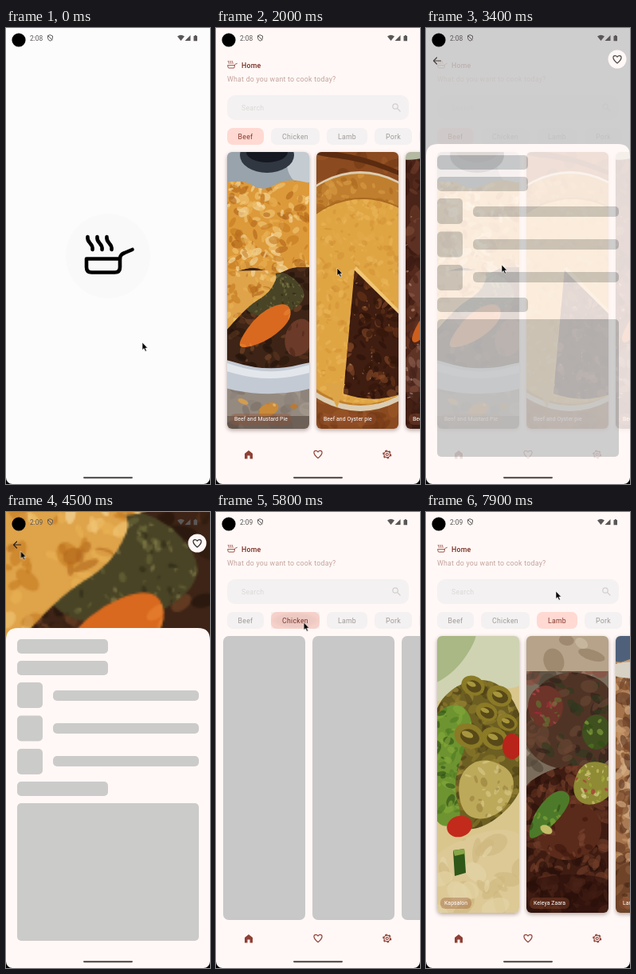
Recreate the animation shown at these times as an HTML page with a canvas. Size 256 px wide and 570 px high, loop 8000 ms.

```html
<!DOCTYPE html>
<html lang="en">
<head>
<meta charset="utf-8">
<title>Recipe app</title>
<style>
  html, body { margin: 0; width: 100%; height: 100%; overflow: hidden; background: #fff8f6; }
  #stage { position: relative; width: 256px; height: 570px; overflow: hidden; font-family: Roboto, Arial, sans-serif; }
  #stage > * { position: absolute; left: 0; top: 0; }
  svg { display: block; }
  text { font-size: 8.72px; letter-spacing: .27px; }
  .loop, .chip, .chip rect, .chip text, .row canvas, .ripple, #cursor {
    animation: 8s linear infinite both;
  }
  .line { fill: none; stroke: currentColor; stroke-linecap: round; stroke-linejoin: round; }

  /* cards */
  .row { width: 256px; height: 570px; }
  .card { position: absolute; top: 155px; width: 103px; height: 346px; border-radius: 6px; background: #f6eeec;
    box-shadow: 0 2px 5px rgba(70, 45, 40, .4); }
  .card canvas { display: block; border-radius: 6px; }
  .card span { position: absolute; left: 4px; bottom: 5px; padding: 0 5px; border-radius: 6px; white-space: nowrap;
    font-size: 6.85px; line-height: 14px; letter-spacing: .08px; color: #fff; background: rgba(150, 80, 50, .36); }
  .skel i { position: absolute; top: 155px; width: 103px; height: 355px; border-radius: 7px; background: #c8c8c8; }

  #splash { animation-name: splash; }
  #skel { animation-name: skel; }
  #beef { animation-name: beef; }
  #beef .track { animation-name: drag; }
  #lamb { animation-name: lamb; }
  #lamb canvas { animation-name: load; }
  #detail { animation-name: detail; }
  #hero { animation-name: hero; }
  #bars { animation-name: pulse; }
  #early { animation-name: early; }
  #late { animation-name: late; }
  #cursor { animation-name: cursor; animation-timing-function: ease-in-out; }

  @keyframes splash { 0%, 3.2% { opacity: 1 } 5.8%, 100% { opacity: 0 } }
  @keyframes skel {
    0%, 12% { opacity: 1 } 15.5%, 71.2% { opacity: 0 }
    71.25%, 83.7% { opacity: 1 } 85.6%, 100% { opacity: 0 }
  }
  @keyframes beef { 0%, 12% { opacity: 0 } 17%, 71.2% { opacity: 1 } 71.25%, 100% { opacity: 0 } }
  @keyframes lamb { 0%, 83.7% { opacity: 0 } 85.6%, 100% { opacity: 1 } }
  @keyframes load { 0%, 93.8% { opacity: 0 } 97.8%, 100% { opacity: 1 } }
  @keyframes drag {
    0%, 25% { transform: none; animation-timing-function: ease-in-out }
    30% { transform: translateX(-112px) }
    31.25% { transform: translateX(-86.5px); animation-timing-function: ease-out }
    35%, 100% { transform: none }
  }
  @keyframes detail {
    0%, 38.2% { opacity: 0 } 42.5% { opacity: .86 } 45.6%, 59.8% { opacity: 1 } 63.1%, 100% { opacity: 0 }
  }
  @keyframes hero { 0%, 48% { opacity: 0 } 52.5%, 100% { opacity: 1 } }
  @keyframes pulse { 0%, 47.5% { opacity: 1 } 52.5% { opacity: .75 } 57.5%, 100% { opacity: 1 } }
  @keyframes early { 0%, 50% { opacity: 1 } 50.01%, 100% { opacity: 0 } }
  @keyframes late { 0%, 50% { opacity: 0 } 50.01%, 100% { opacity: 1 } }
  @keyframes cursor {
    0%, 10% { transform: translate(171px, 393px) }
    18.75%, 25% { transform: translate(152px, 300px) }
    30% { transform: translate(119px, 296px); animation-timing-function: linear }
    31.25% { transform: translate(145.5px, 294px); animation-timing-function: ease-out }
    34%, 36.25% { transform: translate(170px, 295px) }
    38%, 47.5% { transform: translate(95px, 296px) }
    57.5%, 59.5% { transform: translate(16px, 41px) }
    63.75%, 72% { transform: translate(109.5px, 138px) }
    78.75%, 93.8% { transform: translate(168px, 138px) }
    98.5%, 100% { transform: translate(163px, 99px) }
  }

  /* filter chips: current colour pair switches hard */
  .chip { --on: #ffd9d2; --ink: #84392d; }
  .chip rect { fill: #f3f1f1; }
  .chip text { fill: #a09a99; text-anchor: middle; }
  .c1 rect { animation-name: bg1 } .c1 text { animation-name: ink1 }
  .c2 rect { animation-name: bg2 } .c2 text { animation-name: ink2 }
  .c3 rect { animation-name: bg3 } .c3 text { animation-name: ink3 }
  @keyframes bg1 { 0%, 71.2% { fill: var(--on) } 71.25%, 100% { fill: #f3f1f1 } }
  @keyframes ink1 { 0%, 71.2% { fill: var(--ink) } 71.25%, 100% { fill: #a09a99 } }
  @keyframes bg2 { 0%, 71.2% { fill: #f3f1f1 } 71.25%, 82.4% { fill: var(--on) } 82.5%, 100% { fill: #f3f1f1 } }
  @keyframes ink2 { 0%, 71.2% { fill: #a09a99 } 71.25%, 82.4% { fill: var(--ink) } 82.5%, 100% { fill: #a09a99 } }
  @keyframes bg3 { 0%, 82.4% { fill: #f3f1f1 } 82.5%, 100% { fill: var(--on) } }
  @keyframes ink3 { 0%, 82.4% { fill: #a09a99 } 82.5%, 100% { fill: var(--ink) } }
  .ripple { fill: url(#press); }
  #tap2 { animation-name: tap2 }
  #tap3 { animation-name: tap3 }
  @keyframes tap2 { 0%, 69.5% { opacity: 0 } 71.2% { opacity: 1 } 74%, 100% { opacity: 0 } }
  @keyframes tap3 { 0%, 80% { opacity: 0 } 81.1%, 82% { opacity: 1 } 85%, 100% { opacity: 0 } }
</style>
</head>
<body>
<div id="stage">
  <svg width="256" height="570">
    <defs>
      <symbol id="pan" viewBox="96 255 66 55">
        <g class="line" stroke-width="4.6">
          <path d="M101 288.5H143V299Q143 305.5 136.500 305.500H107.500Q101 305.500 101 299Z"/>
          <path d="M143 288.500Q143 283 149 281L158.500 277"/>
          <path id="steam" d="M102.500 261C101 269 110 269 108.500 277M114.500 261C113 269 122 269 120.500 277M126.500 261C125 269 134 269 132.500 277"/>
        </g>
      </symbol>
      <radialGradient id="press">
        <stop offset="0" stop-opacity=".15"/><stop offset=".75" stop-opacity=".13"/><stop offset="1" stop-opacity=".07"/>
      </radialGradient>
    </defs>
    <rect width="256" height="570" fill="#fff8f6"/>
    <use href="#pan" x="14" y="40" width="13" height="11" color="#8f4035"/>
    <text x="32" y="49.500" font-weight="500" fill="#76291e">Home</text>
    <text x="14" y="67" fill="#c3a39e">What do you want to cook today?</text>
    <rect x="14" y="84" width="228" height="31" rx="10" fill="#f3f1f1"/>
    <text x="32" y="103" fill="#dcd8d8">Search</text>
    <g class="line" color="#d3cecd" stroke-width="1.200"><circle cx="225" cy="98" r="3.200"/><path d="M227.500 100.500L231 104"/></g>

    <g class="chip c1"><rect x="14" y="125" width="46" height="21" rx="7"/><text x="37" y="138.700">Beef</text></g>
    <g class="chip c2"><rect x="69" y="125" width="61" height="21" rx="7"/><text x="99.500" y="138.700">Chicken</text></g>
    <g class="chip c3"><rect x="139" y="125" width="51" height="21" rx="7"/><text x="164.500" y="138.700">Lamb</text></g>
    <g class="chip"><rect x="199" y="125" width="47" height="21" rx="7"/><text x="222.500" y="138.700">Pork</text></g>
    <g class="chip"><rect x="255" y="125" width="40" height="21" rx="7"/></g>
    <rect id="tap2" class="ripple" x="69" y="125" width="61" height="21"/>
    <rect id="tap3" class="ripple" x="139" y="125" width="51" height="21"/>

    <g color="#8f4035">
      <path fill="currentColor" d="M36 532L41 528L46 532V538.500H42.500V534.500H39.500V538.500H36Z"/>
      <path class="line" stroke-width="1.200" d="M128 537.700C121 532 122.500 528.300 125.200 528.300Q127 528.300 128 530Q129 528.300 130.800 528.300C133.500 528.300 135 532 128 537.700Z"/>
      <g fill="none" stroke="currentColor" stroke-width="1.200">
        <circle cx="214.700" cy="533" r="3.800"/><circle cx="214.700" cy="533" r="1.500"/>
        <circle cx="214.700" cy="533" r="4.800" stroke-width="1.500" pathLength="12" stroke-dasharray="1 1"/>
      </g>
    </g>
  </svg>

  <div id="skel" class="row skel loop"><i style="left:9px"></i><i style="left:121px"></i><i style="left:233px"></i></div>
  <div id="beef" class="row loop"><div class="track loop"></div></div>
  <div id="lamb" class="row loop"><div class="track"></div></div>

  <div id="detail" class="loop" style="width:256px;height:570px">
    <div style="position:absolute;width:256px;height:570px;background:#c8c8c8"></div>
    <canvas id="hero" class="loop" width="256" height="165" style="position:absolute"></canvas>
    <svg width="256" height="570" style="position:absolute">
      <path fill="#fff8f6" d="M0 570V160Q0 145 15 145H241Q256 145 256 160V570Z"/>
      <g id="bars" class="loop" fill="#c8c8c8">
        <rect x="14" y="159" width="114" height="18" rx="5"/><rect x="14" y="186" width="114" height="18" rx="5"/>
        <rect x="14" y="213" width="32" height="32" rx="5"/><rect x="59" y="223" width="183" height="13" rx="5"/>
        <rect x="14" y="254.500" width="32" height="32" rx="5"/><rect x="59" y="264" width="183" height="13" rx="5"/>
        <rect x="14" y="296" width="32" height="32" rx="5"/><rect x="59" y="305" width="183" height="13" rx="5"/>
        <rect x="14" y="337" width="114" height="18" rx="5"/><rect x="14" y="364" width="228" height="172" rx="5"/>
      </g>
      <path class="line" color="#2d2523" stroke-width="1.200" d="M18.500 41H9.500M13.500 37L9.500 41L13.500 45"/>
      <circle cx="240" cy="39" r="11.500" fill="#fff8f6"/>
      <path class="line" color="#2d2523" stroke-width="1.200" d="M240 44C233 38.300 234.500 34.600 237.200 34.600Q239 34.600 240 36.300Q241 34.600 242.800 34.600C245.500 34.600 247 38.300 240 44Z"/>
    </svg>
  </div>

  <svg id="splash" class="loop" width="256" height="570">
    <rect width="256" height="570" fill="#fcfcfc"/>
    <circle cx="128" cy="285" r="53" fill="#f9f9f9"/>
    <use href="#pan" x="96" y="255" width="66" height="55" color="#000"/>
  </svg>

  <svg width="256" height="570">
    <circle cx="16" cy="15" r="8.600"/>
    <g fill="#5b5757">
      <text id="early" class="loop" x="30" y="16" style="font-size:8.4px;letter-spacing:0">2:08</text>
      <text id="late" class="loop" x="30" y="16" style="font-size:8.4px;letter-spacing:0">2:09</text>
      <path d="M215 10.500Q219.500 7 224 10.500L219.500 16Z"/>
      <path d="M224.500 16H231.500V9Z"/>
      <path d="M235.500 10H236.800V9H238.800V10H240V16.200H235.500Z"/>
    </g>
    <path class="line" color="#5b5757" stroke-width="1" d="M55.500 8.800L58.500 10V12.500Q58.500 15 55.500 16.200Q52.500 15 52.500 12.500V10ZM53 10L58 15"/>
    <rect x="97" y="561" width="62" height="2.200" rx="1.100" fill="#5b5757"/>
    <path d="M0 562A8 8 0 0 0 8 570H0ZM256 562A8 8 0 0 1 248 570H256Z"/>
  </svg>

  <svg id="cursor" width="10" height="14" style="overflow:visible">
    <path d="M0 0V9.500L2.200 7.600L3.800 11.200L5.400 10.500L3.900 7.100H6.700Z" stroke="#fff" stroke-width=".6"/>
  </svg>
</div>

<script>
const W = 103, H = 346;

// Smooth closed outline through the midpoints of the given corners.
function soft(...p) {
  const path = new Path2D(), n = p.length / 2;
  const at = i => [p[(i % n) * 2], p[(i % n) * 2 + 1]];
  const mid = i => at(i).map((v, k) => (v + at(i + 1)[k]) / 2);
  path.moveTo(...mid(0));
  for (let i = 1; i <= n; i++) path.quadraticCurveTo(...at(i), ...mid(i));
  path.closePath();
  return path;
}

function oval(x, y, rx, ry = rx, turn = 0) {
  const path = new Path2D();
  path.ellipse(x, y, rx, ry, turn, 0, 7);
  return path;
}

function box(x, y, w, h) {
  const path = new Path2D();
  path.rect(x, y, w, h);
  return path;
}

// Returns fill(path, colour, specks, size, tints): a flat area with seeded texture.
function painter(canvas, seed) {
  const c = canvas.getContext('2d');
  const rnd = () => (seed = (seed * 16807) % 2147483647) / 2147483647;
  return (path, colour, specks = 0, size = 0, tints = []) => {
    c.save();
    c.filter = 'blur(0.6px)';
    c.fillStyle = colour;
    c.fill(path);
    c.clip(path);
    c.globalAlpha = .6;
    for (let i = 0; i < specks; i++) {
      c.fillStyle = tints[i % tints.length];
      const r = size * (.4 + rnd());
      c.fill(oval(rnd() * W, rnd() * H, r, r * (.3 + rnd() * .5), rnd() * 3));
    }
    c.restore();
  };
}

const gold = ['#f1c878', '#c57a20', '#e9b255', '#f6dfa8', '#b0661a'];
const gravy = ['#5c3520', '#2a170e', '#7a4a2a', '#1f120c'];
const leaf = ['#4f7a22', '#86a83a', '#2d4d14'];

function mustardPie(fill) {
  fill(box(0, 0, W, H), '#98a3ac');
  fill(oval(95, 14, 20, 26), '#c4cbd1');
  fill(oval(50, 4, 34, 22), '#303741');
  fill(oval(50, 0, 26, 13), '#151820');
  fill(box(0, 125, W, 150), '#3d2416', 260, 6, gravy);
  fill(soft(15, 168, 50, 145, 85, 155, 103, 185, 60, 210, 20, 200), '#4a4426', 900, 2.2, ['#6d6a3a', '#2c2a18', '#8a8450']);
  fill(soft(12, 240, 40, 200, 76, 186, 82, 208, 55, 234, 22, 246), '#d9691e', 120, 5, ['#e88434', '#b9500f']);
  fill(oval(90, 232, 17, 24, .3), '#6b3a28', 90, 5, ['#85503a', '#4c2619']);
  fill(soft(-20, 42, 20, 34, 45, 50, 75, 32, 125, 44, 125, 146, 85, 142, 60, 155, 30, 140, -20, 165), '#dd9a3a', 520, 6, gold);
  fill(soft(-20, 150, 30, 148, 66, 148, 54, 176, 26, 192, -20, 245), '#dfa349', 420, 5, gold);
  fill(soft(-20, 268, 50, 284, 125, 270, 125, 380, -20, 380), '#958a80', 200, 9, ['#a89c90', '#7c6f66', '#8b8078']);
  fill(soft(-30, 250, 50, 276, 130, 256, 130, 292, 50, 306, -30, 290), '#c3cad4');
  fill(soft(-30, 254, 50, 280, 130, 259, 130, 270, 50, 288, -30, 266), '#e3e7ec');
  fill(oval(52, 322, 13, 8, -.4), '#c98a3a', 200, 3, gold);
  fill(oval(20, 312, 7, 3, .4), '#d39c50');
  fill(oval(84, 318, 5, 3), '#b97a34');
  fill(box(0, 330, W, 16), 'rgba(60,45,38,.45)');
}

function oysterPie(fill) {
  fill(box(0, 0, W, H), '#8b4a1f', 120, 10, ['#9c5827', '#733a16']);
  fill(soft(-10, -5, 60, 5, 120, 30, 120, 36, 60, 12, -10, 3), '#5b2b10');
  fill(oval(55, 174, 120, 150), '#dccdb2');
  fill(oval(55, 172, 118, 145), '#c07f2e', 260, 6, ['#d99b45', '#a9661f']);
  fill(oval(58, 185, 112, 128), '#a9691f');
  fill(oval(58, 187, 112, 128), '#e0a543', 520, 4, ['#e9b65a', '#d29235', '#e3a84a']);
  const wedge = new Path2D('M48 146L112 210V300Q75 316 34 302Z');
  fill(wedge, '#3f1d10', 420, 6, ['#6b3519', '#2a110a', '#854a28', '#321509']);
  fill(wedge, 'rgba(0,0,0,0)', 160, 1.2, ['#b98a68']);
  fill(new Path2D('M12 290L36 290L26 320Z'), '#dda548');
  fill(new Path2D('M47 147L112 211V206L50 143Z'), '#f0c674');
}

function asado(fill) {
  fill(box(0, 0, W, H), '#4a2418', 300, 10, ['#5d2f20', '#371810', '#6f3c2a']);
  fill(soft(-10, -14, 110, -14, 110, 16, 50, 2, -10, 14), '#b4b9a2');
  fill(soft(15, 50, 55, 45, 110, 55, 110, 84, 60, 96, 30, 85), '#b06c2a', 160, 6, ['#c98a40', '#8f4f1c']);
  fill(oval(32, 108, 34, 26, .3), '#5c3022', 140, 7, ['#7a4936', '#421d13']);
  fill(oval(40, 165, 38, 26, -.3), '#6a3a2c', 140, 7, ['#8a5a4a', '#4a2318']);
  fill(new Path2D('M103 88L88 122L86 176L103 196Z'), '#c3301c', 100, 4, ['#d9492f', '#a52413']);
  fill(soft(55, 210, 85, 190, 115, 170, 115, 205, 85, 225, 60, 228), '#d3913a', 70, 4, ['#e6b35c']);
  fill(soft(5, 235, 20, 205, 38, 190, 34, 215, 15, 240), '#cc5f1d');
  fill(oval(45, 275, 52, 44, -.4), '#5f3425', 260, 8, ['#7a4a39', '#43211a', '#8c6153']);
  fill(box(0, 300, W, 46), 'rgba(40,16,10,.4)');
  fill(box(0, 80, W, 240), 'rgba(0,0,0,0)', 90, 1.8, ['#b99484']);
}

function kapsalon(fill) {
  fill(box(0, 0, W, H), '#d9c68c');
  fill(soft(-20, -20, 120, -20, 120, 70, 40, 60, -20, 95), '#cfd3b2');
  fill(soft(-20, -20, 60, -20, 30, 40, -20, 70), '#a9b884');
  fill(soft(-20, 270, 120, 225, 120, 360, -20, 360), '#dcc996', 80, 14, ['#e4d5a8', '#cfb87e']);
  fill(soft(-10, 95, 30, 55, 80, 55, 112, 110, 112, 190, 70, 235, 30, 245, -10, 225), '#6d5f22', 320, 7, ['#8d7c2c', '#4d3f16', '#a08a3a']);
  fill(soft(-10, 100, 28, 80, 48, 110, 30, 150, 20, 190, 34, 235, -10, 240), '#6d9430', 320, 6, leaf);
  fill(soft(25, 175, 55, 150, 100, 170, 90, 215, 55, 232, 30, 220), '#bda95a', 200, 5, ['#d8cb8c', '#97813a']);
  [[45, 62, 15], [78, 75, 16], [62, 95, 14], [40, 125, 19], [72, 128, 17], [88, 108, 13]].forEach(([x, y, r]) => {
    fill(oval(x, y, r, r * .8, .4), '#8b7a26');
    fill(oval(x + 1, y + 1, r * .65, r * .48, .4), '#574918');
    fill(oval(x - 2, y - 2, r * .4, r * .2, .4), '#a8963e');
  });
  fill(oval(94, 138, 12, 16), '#b8241a', 90, 4, ['#d8402c']);
  fill(oval(28, 238, 16, 13, -.3), '#c22a1c', 90, 4, ['#e0513a', '#9c1c10']);
  fill(new Path2D('M20 268L34 266L36 296L22 300Z'), '#2e5718');
  fill(new Path2D('M20 268L34 266L35 272L22 275Z'), '#86a648');
}

function keleya(fill) {
  fill(box(0, 0, W, H), '#7b6d5c', 90, 14, ['#a39078', '#514637', '#8d4a3a']);
  fill(box(0, 0, W, 44), '#b6a389', 70, 14, ['#d2c3ac', '#8f7a60']);
  fill(soft(10, 60, 60, 40, 115, 65, 115, 165, 30, 170, -10, 130), '#4f3426', 200, 9, ['#6b4734', '#2f3a1e', '#33201a']);
  fill(oval(24, 88, 22, 26), '#6d3429', 260, 4, ['#a9283a', '#5f7a33', '#c4475a']);
  fill(oval(88, 120, 18, 22), '#40501f', 200, 5, leaf);
  fill(soft(-15, 195, 30, 165, 75, 160, 120, 175, 120, 365, -15, 365), '#3f1c12', 480, 8, ['#5f3020', '#2a100a', '#74402a']);
  fill(oval(55, 245, 40, 34, -.4), '#5a2a1a', 240, 6, ['#784431', '#3c170e']);
  fill(soft(0, 255, 12, 215, 40, 190, 58, 200, 45, 225, 18, 250), '#4d7a2a', 500, 4, leaf);
  fill(soft(55, 195, 70, 155, 110, 160, 110, 200, 75, 215), '#8f8a34', 700, 3, ['#d5cc72', '#9fae3e', '#b3283c', '#e0d894']);
  fill(oval(25, 242, 8, 5, .5), '#c4bd68');
  fill(soft(-15, 310, 50, 295, 120, 305, 120, 365, -15, 365), 'rgba(40,14,10,.55)');
}

function lambRoast(fill) {
  fill(box(0, 0, W, H), '#a5744c', 500, 9, ['#c99a6c', '#7b4a2a', '#5a3420', '#d9b48a']);
  fill(soft(-10, -20, 110, -20, 110, 45, 40, 20, -10, 40), '#4f617a');
  fill(soft(-10, 30, 110, 35, 110, 50, -10, 55), '#d8d2c4');
  fill(soft(-10, 280, 110, 270, 110, 365, -10, 365), '#6e4328', 200, 8, ['#8f5f3c', '#4d2b18']);
}

function deal(id, dishes) {
  const track = document.querySelector(id + ' .track');
  dishes.forEach(([name, paint], i) => {
    const card = document.createElement('div');
    const photo = document.createElement('canvas');
    const label = document.createElement('span');
    card.className = 'card';
    card.style.left = 14 + i * 112 + 'px';
    photo.width = W;
    photo.height = H;
    paint(painter(photo, 977 + i * 61));
    label.textContent = name;
    card.append(photo, label);
    track.append(card);
  });
}

deal('#beef', [['Beef and Mustard Pie', mustardPie], ['Beef and Oyster pie', oysterPie], ['Beef Asado', asado]]);
deal('#lamb', [['Kapsalon', kapsalon], ['Keleya Zaara', keleya], ['Lamb Roast', lambRoast]]);

document.querySelector('#hero').getContext('2d')
  .drawImage(document.querySelector('#beef canvas'), 0, 150, W, 66, 0, 0, 256, 165);
</script>
</body>
</html>
```
